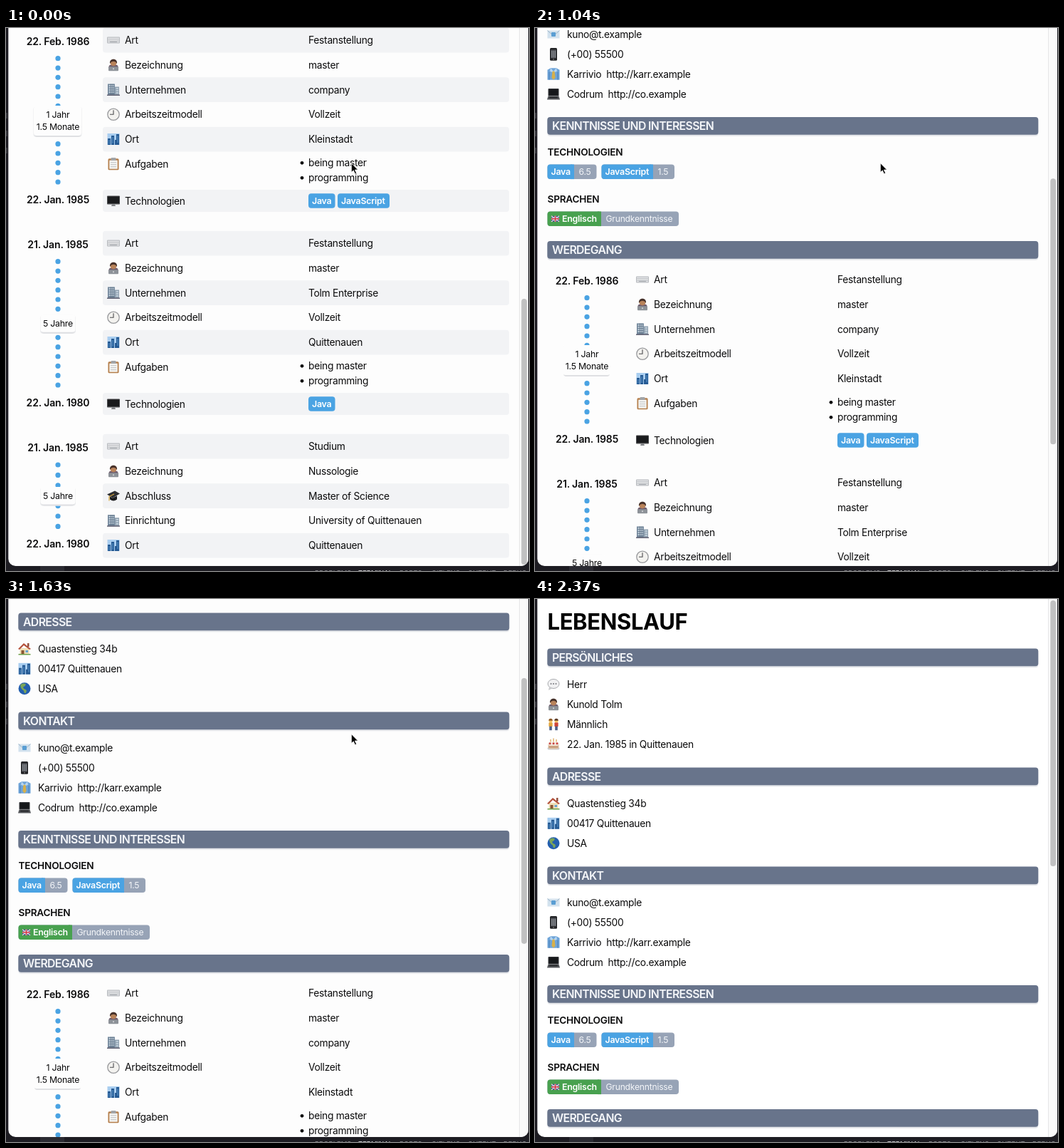
An HTML page that plays this animation: 735 px wide and 762 px high, repeating every 3.27 s.

```html
<!DOCTYPE html>
<html lang="de">
<head>
<meta charset="utf-8">
<title>Lebenslauf</title>
<style>
html, body { margin: 0; width: 100%; height: 100%; overflow: hidden; background: #1d1c22; }
svg { display: block; width: 735px; height: 762px; }
text { font: 400 13.8px Inter, "Open Sans", sans-serif; letter-spacing: -.02em; fill: #0b0b0c; white-space: pre; }
.title { font-size: 31px; font-weight: 700; letter-spacing: -.012em; fill: #000; }
.section { font-size: 15.8px; font-weight: 600; letter-spacing: -.04em; fill: #f4f6f9; }
.sub { font-size: 13.6px; font-weight: 600; letter-spacing: -.015em; }
.date { font-size: 14px; font-weight: 600; letter-spacing: -.01em; text-anchor: middle; }
.span { font-size: 12.3px; text-anchor: middle; }
.tag { font-size: 12.4px; font-weight: 600; fill: #fff; }
.level { font-size: 12.2px; fill: #f4f6f9; }
.tab { font-size: 9.5px; letter-spacing: 0; fill: #8b8b90; }
.tab.active { fill: #e6e6e8; }
</style>
</head>
<body>
<svg id="stage" viewBox="0 0 735 762"></svg>
<script>
const BLUE = '#4aa3e3', GRAY = '#97a3b6', SLATE = '#68748b', GREEN = '#48a14f';

const rect = (x, y, w, h, fill, r = 0, extra = '') =>
  `<rect x="${x}" y="${y}" width="${w}" height="${h}" rx="${r}" fill="${fill}" ${extra}/>`;
const circle = (x, y, r, fill, extra = '') =>
  `<circle cx="${x}" cy="${y}" r="${r}" fill="${fill}" ${extra}/>`;
const path = (d, fill, stroke = 'none', width = 1) =>
  `<path d="${d}" fill="${fill}" stroke="${stroke}" stroke-width="${width}"/>`;
const text = (x, y, content, cls = '') => `<text x="${x}" y="${y}" class="${cls}">${content}</text>`;

// Icons are about 18 px wide and centred on 0,0.
const person = (x, shirt, hair) =>
  rect(x - 2.6, -2.5, 5.2, 6, shirt, 1) + rect(x - 1.8, 3, 3.6, 5.5, '#4d5f86') +
  circle(x, -5, 2.6, '#f2c063') + path(`M${x - 2.7},-5a2.7,3 0 0 1 5.4,0z`, hair);
const icons = {
  keyboard: rect(-9, -4.5, 18, 9, '#b9bcc0', 1) +
    path('M-8,-2.5H8M-8,0H8M-8,2.5H8', 'none', '#e6e7e9', 1.4) +
    path('M-5,2.5H5', 'none', '#aeb1b5', 1),
  developer: rect(-6.5, 0, 13, 8, '#6d5a6b', 3) + circle(0, -3, 4.6, '#b9835a') +
    path('M-5,-2C-6,-10 6,-10 5,-2Q3,-5 0,-5Q-3,-5 -5,-2z', '#46312a') +
    rect(-7, 2.5, 14, 6, '#8d9298', 1) + circle(0, 5.5, 1, '#d8dadd'),
  building: rect(-8, -8, 10, 16, '#73879b') + rect(2, -4, 6, 12, '#91a2b1') +
    path('M-6.5,-5.5H1M-6.5,-2.5H1M-6.5,.5H1M-6.5,3.5H1M3.5,-1.5H7M3.5,1.5H7M3.5,4.5H7', 'none', '#cbd9e4', 1.3) +
    path('M-3.5,-8V8M-.8,-8V8', 'none', '#5f7285', .8) + rect(-9, 7, 18, 1.5, '#667'),
  clock: circle(0, 0, 8.2, '#f3f2ef', 'stroke="#98999c" stroke-width="1.3"') +
    path('M0,-6V0H-5', 'none', '#4a4a4d', 1.1),
  city: rect(-8.5, -8, 17, 16, '#a9cef0') +
    path('M-8,8V-1H-4V8zM-3,8V-5H1V8zM2,8V1H4V-7H8V8z', '#265a93') +
    path('M-6,1V7M-1,-3V6M6,-5V5', 'none', '#5f9bd0', 1),
  clipboard: rect(-7.5, -7.5, 15, 16, '#b57f4c', 1.5) + rect(-5.7, -5, 11.4, 12, '#f5f5f3') +
    rect(-3.5, -8.8, 7, 4, '#a2a5a8', 1) +
    path('M-4,-2H4M-4,1H4M-4,4H4', 'none', '#b9bbbf', .9),
  monitor: rect(-9, -7, 18, 12, '#48494b', 1) + rect(-8, -6, 16, 9.5, '#1a1b1d') +
    path('M-2,5H2L3,7.5H-3z', '#808285'),
  cap: path('M-9,-2L2,-7L9,-3L-1,3z', '#2e2f32') + path('M-5,1L-1,3L5,0V5Q0,9 -5,5z', '#1b1c1e') +
    path('M1,-2.5L-6,1V7', 'none', '#d6a53a', 1.2),
  speech: `<ellipse cx="0" cy="-1" rx="8" ry="6.5" fill="#f1f1f2" stroke="#a9abaf"/>` +
    path('M-6,3L-7,8L-1,5z', '#c9cacd') + [-3.5, 0, 3.5].map(x => circle(x, -1, 1, '#77797d')).join(''),
  couple: person(-4, '#e3a53a', '#8b5a2b') + person(4, '#cf4436', '#5a3a26'),
  cake: rect(-8.5, 4.5, 17, 3.5, '#c9cdd2', 1.7) + rect(-7.5, -2, 15, 9, '#dcbfa3', 3) +
    rect(-7.5, -3, 15, 5, '#f4ebe2', 2.5) + path('M-6.5,4H6.5', 'none', '#b98460', 1.3) +
    path('M-4,-3V-6.5M0,-3V-8M4,-3V-6.5', 'none', '#d8a04e', 1.2) +
    [-5, 0, 5].map(x => circle(x, -.8, 1.5, '#c9413f')).join(''),
  house: rect(-6.5, -1, 13, 9, '#f0dfb6') + path('M-9,0L-1,-8L9,0L7,1L-1,-5L-7,1z', '#b4513b') +
    rect(4, -8, 2.5, 5, '#94503e') + rect(-4.5, 2, 4, 6, '#8a5633') + rect(1.5, 2, 3.5, 3, '#65a3d2') +
    rect(-8.5, 7, 17, 1.5, '#6fa14b'),
  globe: circle(0, 0, 8.5, '#245fae') +
    path('M-6,-5Q-2,-9 2,-6Q1,-3 -2,-2L-1,0L2,1.5Q4,3 1,7Q-1,6 -1,3Q-4,1 -5,-1z', '#7ba558'),
  mail: rect(-8.5, -5.5, 17, 11, '#d3e2ee') + path('M-8.5,-5.5L0,2L8.5,-5.5', 'none', '#9bb2c6', 1) +
    rect(-3, -3, 6, 6, '#5a9ed3', 1),
  phone: rect(-5, -8.8, 10, 17.6, '#222326', 1.5) + rect(-3.8, -6.5, 7.6, 12, '#45474c') +
    [-2.3, 0, 2.3].map(x => path(`M${x},-5V5`, 'none', '#8c9096', 1.3)).join('') + circle(0, 7, .9, '#777'),
  shirt: path('M-8.5,-6L-4,-8.5H4L8.5,-6V8H-8.5z', '#6fa4d8') + path('M-4,-8.5L0,-4L4,-8.5L5,-4L0,-2L-5,-4z', '#b6d6f1') +
    path('M-1.5,-4H1.5L2.5,5L0,8L-2.5,5z', '#d7b04a') + path('M-6,-3V8M6,-3V8', 'none', '#477fb8', 1),
  laptop: rect(-7.5, -7.5, 15, 10.5, '#303236', 1) + rect(-6.3, -6.3, 12.6, 8, '#15171a') +
    path('M-7.5,3H7.5L9,8H-9z', '#54565a') + path('M-6,5H6', 'none', '#1f2023', 1.6)
};
const icon = (name, x, y) => `<g transform="translate(${x} ${y})">${icons[name]}</g>`;

const section = (y, label) =>
  rect(17.3, y - 10, 690, 24.3, '#e3e5e9', 4) + rect(17.3, y - 12.4, 690, 24.6, SLATE, 4) +
  text(24, y + 5.8, label, 'section');

const infoRows = (y, rows) => rows.map(([name, label], i) => {
  const cy = y + i * 27.85;
  return icon(name, 26, cy) + text(45, cy + 5, label);
}).join('');

const pill = (x, y, w, label) => rect(x, y - 10.3, w, 20.6, BLUE, 4) + text(x + 5, y + 4.5, label, 'tag');

const badge = (x, y, w, split, color, label, level, inset = 5) =>
  rect(x, y - 10.3, w, 20.6, GRAY, 4) + rect(x, y - 10.3, split, 20.6, color, 4) +
  rect(x + split - 5, y - 10.3, 5, 20.6, color) +
  text(x + inset, y + 4.5, label, 'tag') + text(x + split + 6.5, y + 4.5, level, 'level');

const flag = (x, y) => `<g transform="translate(${x} ${y})">` + rect(0, -4, 11, 8, '#2d4686') +
  path('M0,-4L11,4M0,4L11,-4', 'none', '#f3dfe2', 1.3) + path('M5.5,-4V4M0,0H11', 'none', '#fff', 2.6) +
  path('M5.5,-4V4M0,0H11', 'none', '#cf3342', 1.6) + '</g>';

const stripe = (cy, h) => rect(136, cy - h / 2, 571, h, '#f2f3f5', 4, 'class="soft"');

const box = (x, y, w, h) =>
  rect(x - .5, y + 1, w + 1, h + 1, '#e9eaec', 4, 'class="soft"') +
  rect(x + 1, y + 4, w - 2, h - 2, '#dfe0e3', 4) + rect(x, y, w, h, '#fdfdfd', 4, 'class="paper"');

// Coordinates below are relative to the centre of the first row.
function timeline({ from, to, end, dots, gap, first, span, boxY }) {
  const h = span.length > 1 ? 42 : 24.5;
  const lines = span.map((s, i) => text(73, boxY + 16.5 + i * 17.5, s, 'span')).join('');
  return text(73, 6.7, from, 'date') + text(73, end + 5, to, 'date') +
    Array.from({ length: dots }, (_, i) => circle(73, first + i * gap, 3.6, BLUE)).join('') +
    (span.length > 1 ? box(39, boxY, 67, h) : box(48.5, boxY, 49, h)) + lines;
}

const PITCH = 34.75;
const rowsOf = rows => rows.map(([name, label, value], i) => {
  const cy = i * PITCH;
  return (i % 2 ? '' : stripe(cy, PITCH)) + icon(name, 151, cy) +
    text(167, cy + 5, label) + text(425, cy + 5, value);
}).join('');

const job = (firm, place, skills) => rowsOf([
  ['keyboard', 'Art', 'Festanstellung'],
  ['developer', 'Bezeichnung', 'master'],
  ['building', 'Unternehmen', firm],
  ['clock', 'Arbeitszeitmodell', 'Vollzeit'],
  ['city', 'Ort', place]
]) + icon('clipboard', 151, 173.7) + text(167, 178.7, 'Aufgaben') +
  ['being master', 'programming'].map((task, i) =>
    circle(416, 172.3 + i * 21, 2.4, '#0b0b0c') + text(425, 177 + i * 21, task)).join('') +
  stripe(225.5, 31) + icon('monitor', 151, 225.5) + text(167, 230.5, 'Technologien') + skills;

const entry = (y, body) => `<g transform="translate(0 ${y})">${body}</g>`;

const page =
  text(17.5, 43.2, 'LEBENSLAUF', 'title') +
  section(82, 'PERSÖNLICHES') + infoRows(120, [
    ['speech', 'Herr'], ['developer', 'Kunold Tolm'], ['couple', 'Männlich'],
    ['cake', '22. Jan. 1985 in Quittenauen']]) +
  section(249, 'ADRESSE') + infoRows(287, [
    ['house', 'Quastenstieg 34b'], ['city', '00417 Quittenauen'], ['globe', 'USA']]) +
  section(388, 'KONTAKT') + infoRows(426, [
    ['mail', 'kuno@t.example'], ['phone', '(+00) 55500'],
    ['shirt', 'Karrivio<tspan dx="7">http://karr.example</tspan>'],
    ['laptop', 'Codrum<tspan dx="7">http://co.example</tspan>']]) +
  section(554.5, 'KENNTNISSE UND INTERESSEN') +
  text(17.5, 596, 'TECHNOLOGIEN', 'sub') +
  badge(17.5, 618.8, 69, 37.5, BLUE, 'Java', '6.5') +
  badge(93.5, 618.8, 102.5, 72.5, BLUE, 'JavaScript', '1.5') +
  text(17.5, 662, 'SPRACHEN', 'sub') +
  badge(17.5, 684.8, 184.5, 75.5, GREEN, 'Englisch', 'Grundkenntnisse', 20.5) + flag(23, 684.8) +
  section(728.5, 'WERDEGANG') +
  entry(770, job('company', 'Kleinstadt', pill(425, 225.5, 37.5, 'Java') + pill(466, 225.5, 73, 'JavaScript')) +
    timeline({ from: '22. Feb. 1986', to: '22. Jan. 1985', end: 224.3, dots: 14, gap: 13.33, first: 25.7,
      span: ['1 Jahr', '1.5 Monate'], boxY: 92 })) +
  entry(1055, job('Tolm Enterprise', 'Quittenauen', pill(425, 225.5, 37.5, 'Java')) +
    timeline({ from: '21. Jan. 1985', to: '22. Jan. 1980', end: 224.3, dots: 14, gap: 13.33, first: 25.7,
      span: ['5 Jahre'], boxY: 100.3 })) +
  entry(1340, rowsOf([
    ['keyboard', 'Art', 'Studium'],
    ['developer', 'Bezeichnung', 'Nussologie'],
    ['cap', 'Abschluss', 'Master of Science'],
    ['building', 'Einrichtung', 'University of Quittenauen'],
    ['city', 'Ort', 'Quittenauen']
  ]) + timeline({ from: '21. Jan. 1985', to: '22. Jan. 1980', end: 137.3, dots: 7, gap: 14.4, first: 26,
      span: ['5 Jahre'], boxY: 57 }));

const tabs = [[434, 'PROBLEMS'], [495, 'TERMINAL'], [553, 'PORTS'], [598, 'GITLENS'], [649, 'OUTPUT'], [699, 'DEBUG C']];
const backdrop = rect(0, 0, 735, 762, '#1d1c22') + rect(48, 755, 34, 7, '#2b2b32') +
  [123, 148, 172].map(y => rect(0, y - 4, 2, 8, '#3a3a40')).join('') +
  tabs.map(([x, label]) => text(x, 767.6, label, label === 'TERMINAL' ? 'tab active' : 'tab')).join('');

const stage = document.getElementById('stage');
stage.innerHTML = `<defs><clipPath id="window">${rect(3.3, -20, 730.7, 775, '#fff', 10)}</clipPath></defs>` +
  backdrop + `<g clip-path="url(#window)">` + rect(0, 0, 735, 762, '#fdfdfd', 0, 'class="paper"') +
  `<g id="page">${page}</g>` + rect(721, 0, 14, 762, '#fafafa') + rect(721, 0, 1, 762, '#e6e6e7') +
  rect(724.3, 2, 7.7, 373, '#c1c1c2', 3.85, 'id="thumb"') + '</g>' +
  `<g id="cursor">${path('M0,0V13.2L3,10.4L5.2,15.2L7.4,14.2L5.2,9.6H9.4z', '#000', '#fff', .9)}</g>`;

const pageEl = document.getElementById('page');
const thumb = document.getElementById('thumb');
const cursor = document.getElementById('cursor');
const papers = stage.querySelectorAll('.paper');
const softs = stage.querySelectorAll('.soft');

const LOOP = 3270, MAX_SCROLL = 753, THUMB_TRAVEL = 378;
const scrollSteps = [[0, 753], [450, 742], [590, 439.5], [1040, 417], [1180, 285], [1330, 228.5], [1630, 217], [1780, 0]];
const cursorSteps = [[0, 485.3, 189.5], [2220, 658.8, 411.8], [2370, -50, -50]];
const at = (steps, t) => steps.filter(([start]) => start <= t).pop();

function render(t) {
  const [, scroll] = at(scrollSteps, t);
  const [, x, y] = at(cursorSteps, t);
  pageEl.setAttribute('transform', `translate(0 ${-scroll})`);
  thumb.setAttribute('y', 2 + scroll / MAX_SCROLL * THUMB_TRAVEL);
  cursor.setAttribute('transform', `translate(${x} ${y})`);
  // Faint fills show only near the bottom of the page.
  softs.forEach(el => el.setAttribute('visibility', scroll > 700 ? 'visible' : 'hidden'));
  papers.forEach(el => el.setAttribute('fill', scroll ? '#fdfdfd' : '#fff'));
}

const begin = performance.now();
function tick() {
  render((performance.now() - begin) % LOOP);
  requestAnimationFrame(tick);
}
tick();
</script>
</body>
</html>
```
